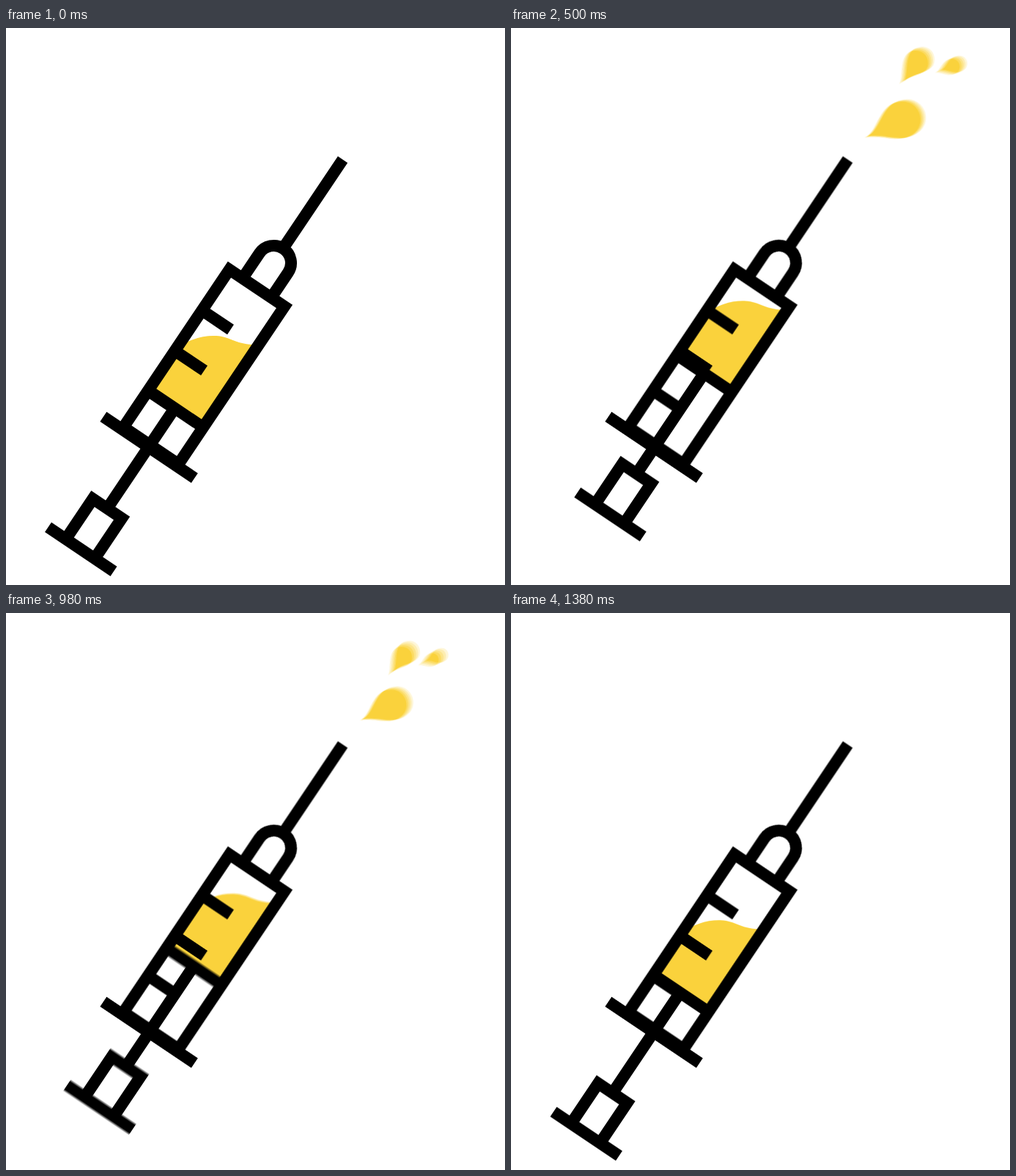
These frames come from a looping animation (681 by 760 pixels, 1420 ms). An HTML page:

```html
<!DOCTYPE html>
<html lang="en">
<head>
<meta charset="utf-8">
<title>Syringe</title>
<style>
  html, body { margin: 0; width: 100%; height: 100%; overflow: hidden; background: #fff; }
  svg { display: block; width: 100vw; height: 100vh; }
  .line { fill: none; stroke: #000; stroke-width: 16; }
  .fluid { fill: #fad238; }
  #moving { isolation: isolate; }
  .ghost { mix-blend-mode: plus-lighter; }
</style>
</head>
<body>
<svg viewBox="0 0 681 760">
  <defs>
    <clipPath id="tube">
      <rect x="-44" y="-262" width="90" height="262" transform="translate(195.1 572.2) rotate(33.9)"/>
    </clipPath>
    <path id="fill" class="fluid" d="M169 478L228 441C248 424 270 419 287 420C306 421 312 431 337 432H370L294 561Z"/>
    <path id="drops" class="fluid" d="
      M505 144C528 134 528 91 566 91C582 91 594 104 594 119C594 137 578 149 558 149C540 149 528 142 505 144Z
      M564 64C572 50 564 13 592 13C603 13 611 21 611 32C611 55 582 48 564 64Z
      M621 49C630 46 632 29 648 29C655 29 660 34 660 41C660 49 653 54 645 54C636 54 630 49 621 49Z"/>
    <path id="plunger" class="line" transform="translate(195.1 572.2) rotate(33.9)" d="
      M-42 -64H44 M-.7 -64V101
      M-24.4 167V101H23.2V167 M-53.4 167.2H54.4"/>
  </defs>
  <g id="moving"></g>
  <path class="line" transform="translate(195.1 572.2) rotate(33.9)" d="
    M-75 0H75
    M-44.2 -3.5V-262.7H46.2V-3.5Z
    M-44 -195.5H2.8 M-44 -129H4.2 M-44 -63.4H5
    M-22.6 -262V-303.8A23.6 23.6 0 0 1 24.6 -303.8V-262
    M.5 -327V-473.4"/>
</svg>
<script>
const LOOP = 1420, HOLD = 140, STEP = 40;
const PUSH = 79, SPRAY = 210, TURN = 745, END = 1430;
const SAMPLES = 5, SHUTTER = 24;

const clamp = v => Math.min(1, Math.max(0, v));
const span = (t, a, b) => clamp((t - a) / (b - a));
const easeOut = (s, n) => 1 - (1 - s) ** n;
const bezier = (e, a, b, c) => 3 * e * (1 - e) ** 2 * a + 3 * e * e * (1 - e) * b + e ** 3 * c;

const moving = document.getElementById('moving');

// Translucent copies that add up to motion blur
const ghosts = Array.from({ length: SAMPLES }, () => {
  const g = document.createElementNS('http://www.w3.org/2000/svg', 'g');
  g.setAttribute('class', 'ghost');
  g.setAttribute('opacity', 1 / SAMPLES);
  g.innerHTML = '<use href="#drops"/><g clip-path="url(#tube)"><use href="#fill"/></g><use href="#plunger"/>';
  moving.append(g);
  const [drops, fill, plunger] = g.querySelectorAll('use');
  return { drops, fill, plunger };
});

function pose(t) {
  const back = (1 + Math.cos(Math.PI * span(t, TURN, END))) / 2;
  const push = easeOut(span(t, PUSH, TURN), 3) * back;
  const spray = 1.03 * easeOut(span(t, SPRAY, TURN), 2) * back;
  const size = t < TURN ? spray * (1.5 - spray / 2) : spray;
  return { push, spray, size };
}

function place({ drops, fill, plunger }, t) {
  const { push, spray, size } = pose(t);
  const shift = `translate(${35 * push} ${-50 * push})`;
  fill.setAttribute('transform', shift);
  plunger.setAttribute('transform', shift);
  const x = 458 + bezier(spray, -15, 72, 124);
  const y = 180 - bezier(spray, 11, 100, 100);
  drops.setAttribute('transform',
    `translate(${x} ${y}) rotate(${-16 * (1 - spray)}) scale(${size}) translate(-582 -80)`);
  drops.setAttribute('visibility', size > 0.02 ? 'visible' : 'hidden');
}

function draw(now) {
  const t = now % LOOP;
  const tick = t < HOLD ? 0 : HOLD + Math.floor((t - HOLD) / STEP) * STEP;
  ghosts.forEach((g, i) => place(g, tick + (i / (SAMPLES - 1) - 0.5) * SHUTTER));
}

const start = performance.now();
function loop() {
  draw(performance.now() - start);
  requestAnimationFrame(loop);
}
loop();
</script>
</body>
</html>
```
